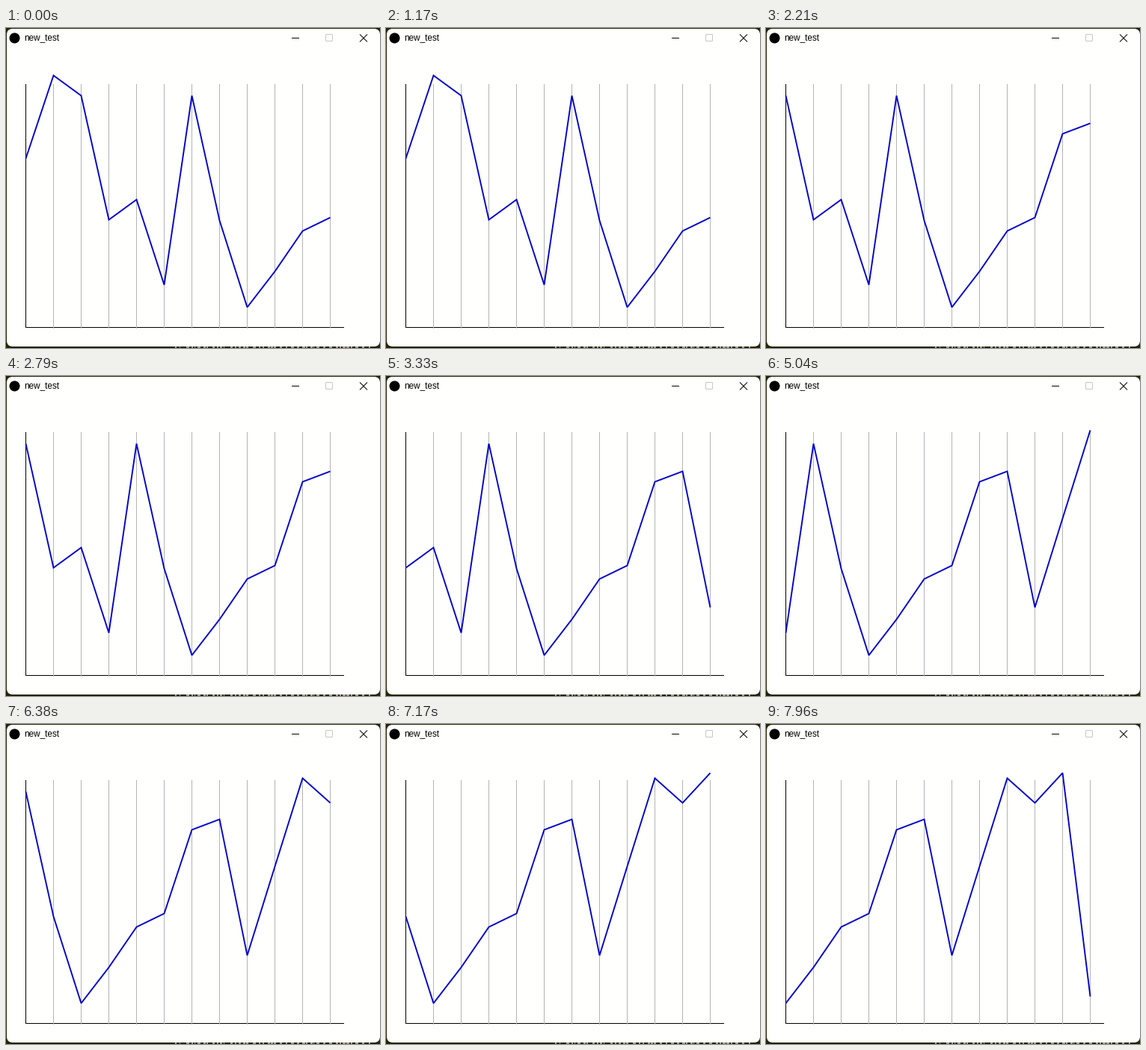
Animation, 500 px wide and 428 px high, one loop 8000 ms. Source, as a matplotlib script:

```python
import random

import matplotlib.pyplot as plt
from matplotlib.animation import FuncAnimation
from matplotlib.patches import Circle, FancyBboxPatch, Rectangle

W, H, DPI = 500, 428, 100
INTERVAL, FRAMES = 40, 200
PX = 72 / DPI

LEFT, TOP, BASE, STEP, COUNT = 26, 75, 400, 37, 12
VALUES = [174, 63, 90, 256, 229, 343, 90, 257, 373, 325,
          271, 253, 141, 127, 309, 190, 72, 105, 65, 364]
FIRST_TICK, TICK = 1835, 1000

EDGE, PAPER, INK = "#242408", "#fffffd", "#000000"
GRID, FADED, BLUE, SPECK = "#b4b4b4", "#c8c8c0", "#0000cc", "#a0a090"

fig = plt.figure(figsize=(W / DPI, H / DPI), dpi=DPI, facecolor=EDGE)
ax = fig.add_axes([0, 0, 1, 1])
ax.set_xlim(0, W)
ax.set_ylim(H, 0)
ax.axis("off")


def stroke(xs, ys, color=INK, width=1, z=3):
    line, = ax.plot([x + 0.5 for x in xs], [y + 0.5 for y in ys], color=color,
                    lw=width * PX, zorder=z,
                    solid_capstyle="butt", solid_joinstyle="miter")
    return line


def bar(x, y, w, h, color=INK, z=3):
    ax.add_patch(Rectangle((x, y), w, h, fc=color, lw=0, antialiased=False, zorder=z))


def draw_window():
    # Cut-off tops of whatever lies below the window.
    rng = random.Random(4)
    x = 226
    while x < W - 12:
        bar(x, H - 2, rng.randint(1, 4), 2, SPECK, z=0)
        x += rng.randint(4, 9)

    ax.add_patch(FancyBboxPatch((9, 9), W - 17, H - 19, fc=PAPER, lw=0, zorder=1,
                                boxstyle="round,pad=8,rounding_size=8"))
    ax.add_patch(Circle((11.5, 13.5), 7, fc=INK, lw=0, zorder=2))
    ax.text(24.5, 17, "new_test", family="Liberation Sans", size=11.8 * PX,
            color=INK, va="baseline", zorder=3)
    bar(382, 13, 10, 1)
    ax.add_patch(FancyBboxPatch((428.5, 9.5), 7, 7, fill=False, ec=FADED, lw=PX,
                                boxstyle="round,pad=1,rounding_size=1", zorder=3))
    stroke([472.5, 482.5], [8, 18])
    stroke([472.5, 482.5], [18, 8])


def draw_chart():
    bar(LEFT, TOP, 1, BASE + 1 - TOP)
    bar(LEFT, BASE, 426, 1)
    for k in range(1, COUNT):
        bar(LEFT + k * STEP, TOP, 1, BASE + 2 - TOP, GRID, z=4)


def shift_at(t):
    # The first update brings in two samples, later ones a single sample.
    return 0 if t < FIRST_TICK else 2 + int((t - FIRST_TICK) // TICK)


draw_window()
draw_chart()
curve = stroke([LEFT + k * STEP for k in range(COUNT)], VALUES[:COUNT],
               BLUE, width=1.9, z=5)


def update(frame):
    start = shift_at(frame * INTERVAL)
    curve.set_ydata([v + 0.5 for v in VALUES[start:start + COUNT]])
    return curve,


anim = FuncAnimation(fig, update, frames=FRAMES, interval=INTERVAL,
                     repeat=True, repeat_delay=0, blit=False)
plt.show()
```
